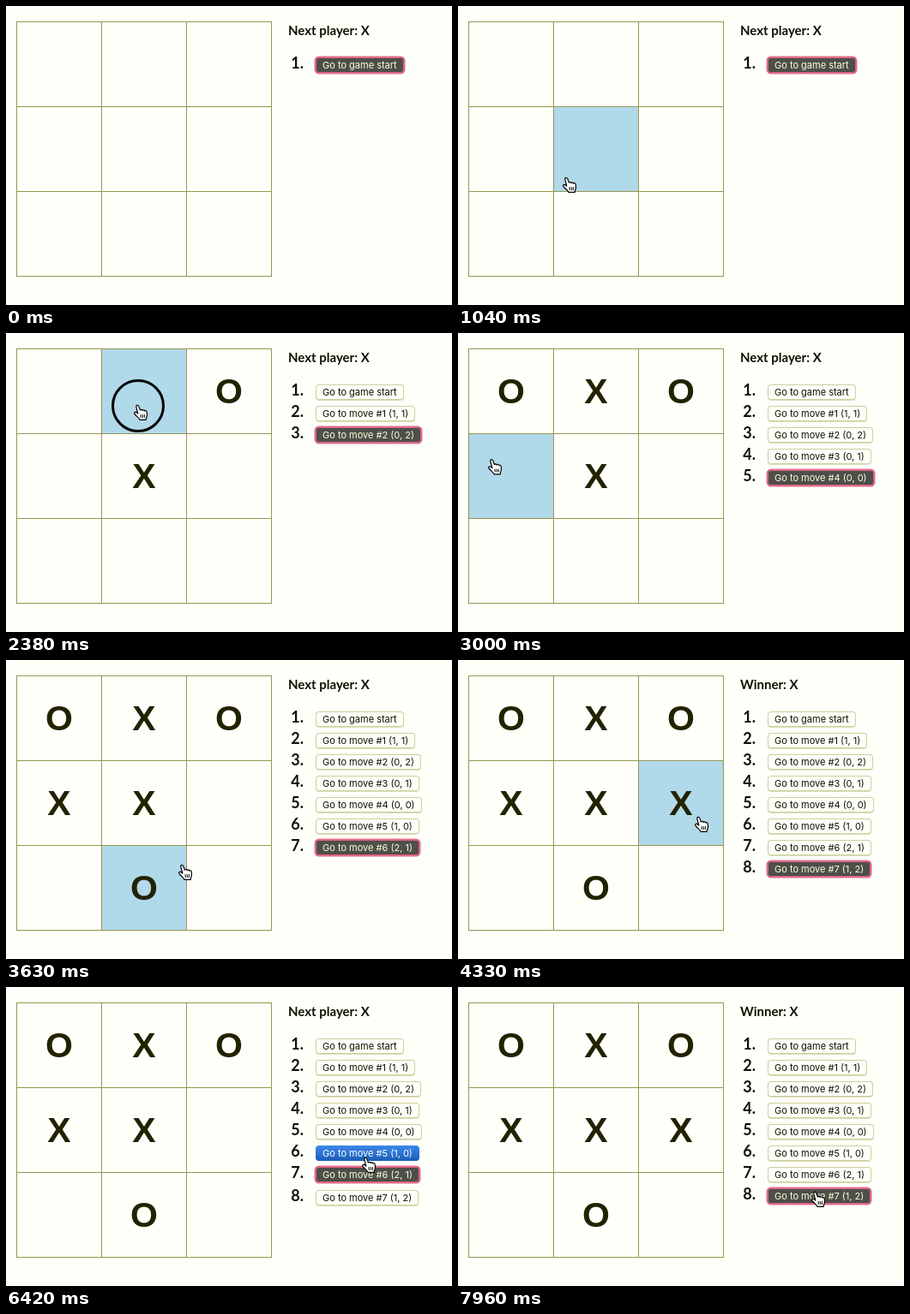
Animation, 520 px wide and 349 px high, one loop 8 s. Source, as an HTML page:

```html
<!DOCTYPE html>
<html lang="en">
<head>
<meta charset="utf-8">
<title>Tic-tac-toe with move history</title>
<style>
html, body { margin: 0; width: 100%; height: 100%; overflow: hidden; background: #fffffa; }
#stage { position: relative; width: 520px; height: 349px; overflow: hidden; color: #111100; }
#stage > * { position: absolute; }
.cell {
  box-sizing: border-box; width: 100px; height: 100px; border: 1px solid #97974f;
  font: bold 41px/99px "Liberation Sans", Arial, sans-serif; text-align: center; color: #222200;
}
.cell.hover { background: #b0d9e9; }
#status { left: 329px; top: 18px; font: bold 15px/20px Lato, sans-serif; white-space: pre; }
.move { left: 320px; height: 22px; white-space: nowrap; }
.move b { position: absolute; right: 100%; margin-right: -27px; top: -2px; font: bold 18px/21px Lato, sans-serif; }
.move span {
  position: absolute; left: 41px; top: 2px; padding: 0 8px; border-radius: 4px;
  font: 11px/18px Inter, sans-serif; box-shadow: inset 0 0 0 1px #cfcf9c, 0 1px 0 #dcdcbc;
}
.move.hover span { color: #fff; background: linear-gradient(#3d88ea, #1a5db8); box-shadow: none; }
.move.current span { color: #ffffdc; background: #4e4e4a; box-shadow: inset 0 0 0 1px #e0607f, 0 0 0 1.5px #e0708c; }
svg { left: 0; top: 0; }
</style>
</head>
<body>
<div id="stage">
  <div id="status"></div>
  <svg width="520" height="349">
    <g id="pointer" stroke-linejoin="round" stroke-linecap="round">
      <circle id="press" r="29.5" fill="none" stroke="#000" stroke-width="3"/>
      <g id="hand" stroke="#000" stroke-width="1.2">
        <path fill="#fff" d="M-2.2 1.2C-2.8-.8 0-1.4.8.6L2.4 5C3.2 4 4.8 4.2 5 5.4C6 4.4 7.6 5 7.7 6C9 5.3 10.4 6 10.3 7.6L10.5 11C10.3 13 9.2 14 9.2 16.3H2C1 13.8-1.8 12.6-4 9.4C-5.2 7.6-3 6.6-1.6 7.8L-.2 9Z"/>
        <path fill="none" stroke-width="1" d="M3 10.5l.3 3M5.2 10.5l.2 3M7.4 10.5v3"/>
      </g>
      <path id="arrow" fill="#000" stroke="#fff" d="M0 0V14L3.2 11L5.4 16L7.8 15L5.6 10.2H10Z"/>
    </g>
  </svg>
</div>
<script>
const LOOP = 8000, SIZE = 99, LEFT = 12, TOP = 18;
const MOVES = [[1, 1], [0, 2], [0, 1], [0, 0], [1, 0], [2, 1], [1, 2]];

// Pointer path: time, x, y
const PATH = [
  [580, 60, 280], [1400, 173, 147], [1640, 173, 147], [1940, 240, 85], [2060, 240, 85],
  [2320, 154, 85], [2430, 154, 85], [2680, 40, 80], [2800, 40, 80], [3020, 40, 150],
  [3140, 40, 150], [3430, 180, 246], [3540, 180, 246], [3630, 206, 240], [3960, 208, 240],
  [4190, 281, 184], [5220, 281, 184], [5600, 400, 285], [5680, 430, 285], [5940, 461, 222],
  [6060, 461, 222], [6420, 420, 200], [6500, 420, 197], [6730, 418, 172], [6840, 418, 172],
  [7300, 418, 172], [7370, 418, 194], [7430, 418, 194], [7570, 418, 218], [7640, 418, 218],
  [7820, 417, 240], [8000, 417, 240]
];
// Mouse down, mouse up, move shown after release
const CLICKS = [
  [1520, 1640, 1], [1950, 2060, 2], [2330, 2430, 3], [2690, 2800, 4], [3030, 3140, 5],
  [3440, 3540, 6], [4200, 4310, 7], [5950, 6060, 6], [6430, 6460, 5], [6740, 6840, 4],
  [7375, 7430, 5], [7575, 7640, 6], [7830, 7910, 7]
];

const byId = id => document.getElementById(id);
const stage = byId("stage"), svg = stage.querySelector("svg");
const show = (node, on) => { node.style.display = on ? "" : "none"; };

function add(className, left, top, html = "") {
  const node = document.createElement("div");
  node.className = className;
  node.style.left = left + "px";
  node.style.top = top + "px";
  node.innerHTML = html;
  return stage.insertBefore(node, svg);
}

const cells = Array.from({ length: 9 }, (_, i) =>
  add("cell", LEFT + i % 3 * SIZE, TOP + Math.floor(i / 3) * SIZE));
const items = Array.from({ length: 8 }, (_, i) => {
  const label = i ? `move #${i} (${MOVES[i - 1].join(", ")})` : "game start";
  return add("move", 320, 0, `<b>${i + 1}.</b><span>Go to ${label}</span>`);
});

function pointerAt(t) {
  const next = PATH.findIndex(p => p[0] > t);
  if (next < 1) return null;
  const [t0, x0, y0] = PATH[next - 1], [t1, x1, y1] = PATH[next];
  const k = (t - t0) / (t1 - t0), e = k * k * (3 - 2 * k);
  return { x: x0 + (x1 - x0) * e, y: y0 + (y1 - y0) * e };
}

function draw(t) {
  const done = CLICKS.filter(c => c[1] <= t).map(c => c[2]);
  const step = done.length ? done[done.length - 1] : 0;
  const latest = Math.max(0, ...done);
  const pos = pointerAt(t);
  let hovering = false;

  cells.forEach((cell, i) => {
    const row = Math.floor(i / 3), col = i % 3;
    const turn = MOVES.findIndex(m => m[0] === row && m[1] === col);
    cell.textContent = turn >= 0 && turn < step ? "XO"[turn % 2] : "";
    const over = !!pos && Math.floor((pos.x - LEFT) / SIZE) === col && Math.floor((pos.y - TOP) / SIZE) === row;
    cell.classList.toggle("hover", over);
    hovering = hovering || over;
  });

  items.forEach((item, i) => {
    const center = 69 + 25 * i + (i > step ? 2 : 0);
    const over = !!pos && i <= latest && pos.x > 361 && pos.x < 484 && Math.abs(pos.y - center) < 9;
    show(item, i <= latest);
    item.style.top = center - 11 + "px";
    item.classList.toggle("current", i === step);
    item.classList.toggle("hover", over && i !== step);
    hovering = hovering || over;
  });

  byId("status").textContent = step === 7 ? "Winner: X" : "Next player: " + "XO"[step % 2];
  show(byId("pointer"), pos);
  if (!pos) return;
  byId("pointer").setAttribute("transform", `translate(${pos.x} ${pos.y})`);
  show(byId("press"), CLICKS.some(c => t >= c[0] && t < c[1]));
  show(byId("hand"), hovering);
  show(byId("arrow"), !hovering);
}

const start = performance.now();
function tick() {
  draw((performance.now() - start) % LOOP);
  requestAnimationFrame(tick);
}
tick();
</script>
</body>
</html>
```
